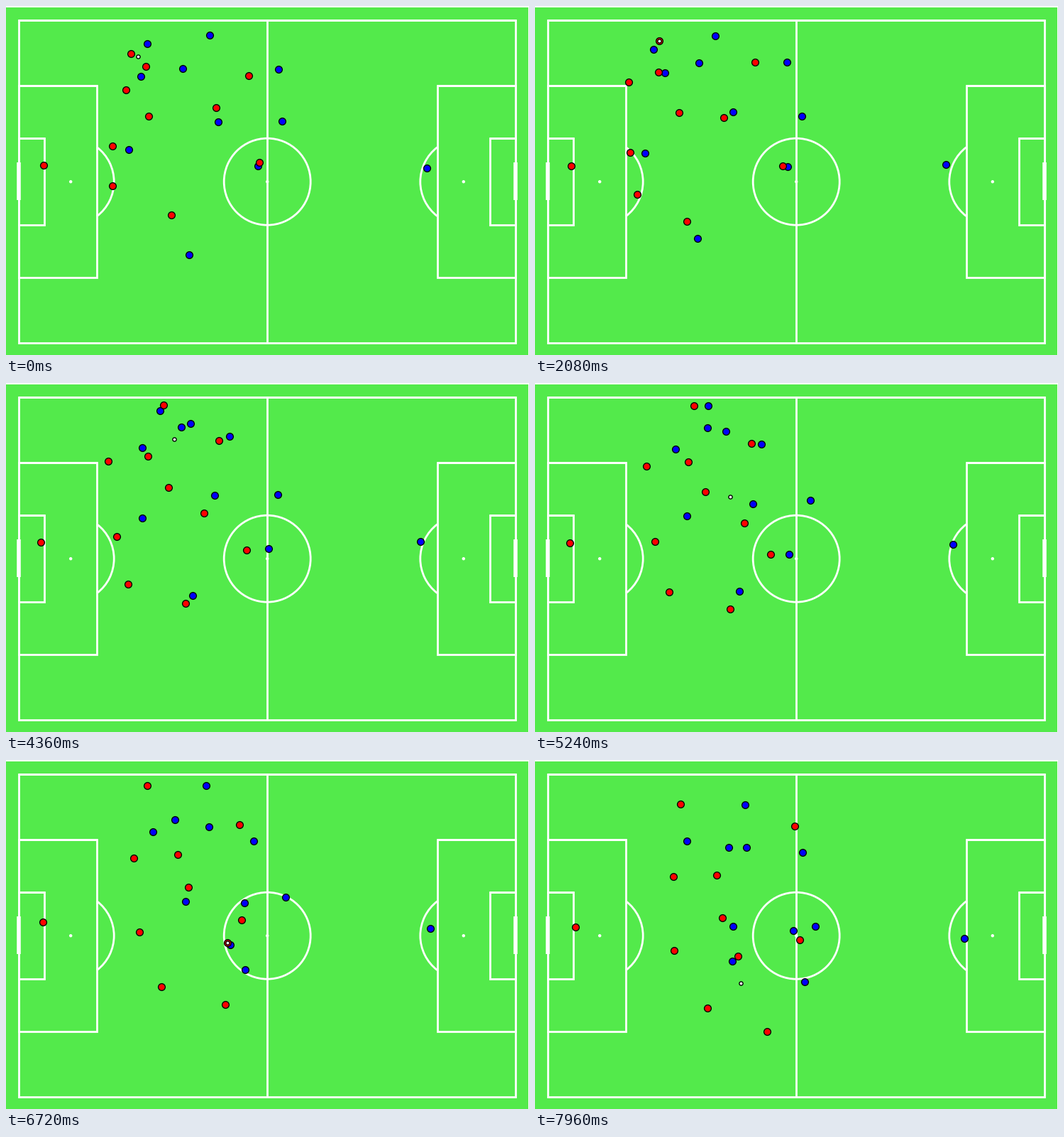
Write a matplotlib script that moves like this. It is 737 by 491 pixels and loops after 8000 ms.

```python
import numpy as np
import matplotlib.pyplot as plt
from matplotlib.animation import FuncAnimation
from matplotlib.patches import Arc, Circle, Rectangle

W, H, DPI = 737, 491, 64
PX = 72 / DPI                      # one pixel in points
LINE, EDGE = 2.78 * PX, 1.39 * PX
FRAMES, STEP = 200, 40
GREEN = "#53ea4b"


def run(*points):
    """Smooth polynomial path through points evenly spaced in time."""
    n = len(points)
    fit = np.polyfit(np.linspace(0, 1, n), points, n - 1)
    t = np.linspace(0, 1, FRAMES)
    return np.vander(t, n) @ fit


winger = run((176, 67), (169, 58), (199, 35), (225, 31), (206, 34), (205, 62))
pivot = run((357, 220), (347, 227), (331, 242), (286, 276))
reds = [
    run((53, 224), (50, 225), (49, 225), (57, 235)),
    run((150, 197), (137, 208), (170, 224), (196, 268)),
    run((150, 253), (148, 269), (190, 295), (243, 349)),
    run((169, 118), (131, 106), (158, 118), (195, 164)),
    run((233, 294), (220, 304), (277, 319), (327, 382)),
    run((201, 155), (208, 148), (241, 154), (264, 222)),
    run((197, 85), (177, 95), (217, 112), (256, 162)),
    run((296, 143), (265, 162), (296, 198), (373, 253)),
    run((342, 98), (305, 78), (306, 85), (366, 93)),
    pivot,
    winger,
]
blues = [
    run((593, 228), (579, 222), (589, 227), (605, 251)),
    run((384, 89), (357, 80), (317, 72), (331, 99), (377, 130)),
    run((389, 162), (376, 154), (388, 166), (395, 234)),
    run((355, 225), (355, 226), (372, 231), (340, 249), (278, 283)),
    run((258, 350), (232, 319), (290, 293), (380, 312)),
    run((299, 163), (280, 149), (308, 171), (364, 240)),
    run((249, 88), (230, 81), (247, 63), (238, 70), (273, 123)),
    run((287, 41), (252, 44), (270, 69), (298, 123)),
    run((173, 202), (160, 203), (216, 187), (279, 234)),
    run((190, 99), (184, 93), (198, 93), (214, 114)),
    run((199, 53), (166, 61), (206, 43), (265, 31), (296, 63)),
]


def roll(start, end, *spells):
    """Ball stays with each carrier for a spell and rolls straight between."""
    times, places = [[0]], [[start]]
    for carrier, first, last in spells:
        times.append(np.arange(first, last))
        places.append(carrier[first:last])
    times = np.concatenate(times + [[FRAMES - 1]])
    places = np.concatenate(places + [[end]])
    f = np.arange(FRAMES)
    return np.column_stack([np.interp(f, times, c) for c in places.T])


ball = roll((186, 71), (290, 314), (winger, 10, 97), (pivot, 156, 185))

fig = plt.figure(figsize=(W / DPI, H / DPI), dpi=DPI, facecolor="white")
ax = fig.add_axes([0, 0, 1, 1])
ax.set_xlim(0, W)
ax.set_ylim(H, 0)
ax.axis("off")


def line(xs, ys, width=LINE):
    ax.plot(xs, ys, color="white", lw=width, zorder=2,
            solid_capstyle="butt", solid_joinstyle="miter")


def box(x0, x1, y0, y1):
    line([x0, x1, x1, x0, x0, x1], [y0, y0, y1, y1, y0, y0])


def ring(x, theta1=0, theta2=360):
    ax.add_patch(Arc((x, 247.2), 122, 122, theta1=theta1, theta2=theta2,
                     ec="white", lw=LINE, zorder=2))


def spot(x):
    ax.add_patch(Circle((x, 247.2), 2.2, fc="white", ec="none", zorder=2))


ax.add_patch(Rectangle((0, 2), W - 1, H - 2, fc=GREEN, ec="none", zorder=1))
box(18, 718, 20, 474)
line([368, 368], [20, 474])
ring(368.2)
spot(368.2)
reach = np.degrees(np.arccos(37 / 61))
for goal, d, turn in ((18, 1, 0), (718, -1, 180)):
    box(goal, goal + 110 * d, 112, 382)
    box(goal, goal + 36 * d, 186, 308)
    line([goal, goal], [220, 273], 2 * LINE)
    ring(goal + 73.2 * d, turn - reach, turn + reach)
    spot(goal + 73.2 * d)


def dots(color, size, z):
    return ax.plot([], [], "o", mfc=color, mec="black", ms=size * PX,
                   mew=EDGE, zorder=z)[0]


layers = [(dots("blue", 9.72, 3), np.array(blues)),
          (dots("red", 9.72, 4), np.array(reds)),
          (dots("white", 5.2, 5), ball[None])]


def draw(f):
    for dot, paths in layers:
        dot.set_data(paths[:, f, 0], paths[:, f, 1])
    return [dot for dot, _ in layers]


anim = FuncAnimation(fig, draw, frames=FRAMES, interval=STEP,
                     repeat=True, repeat_delay=0, blit=False)
plt.show()
```
